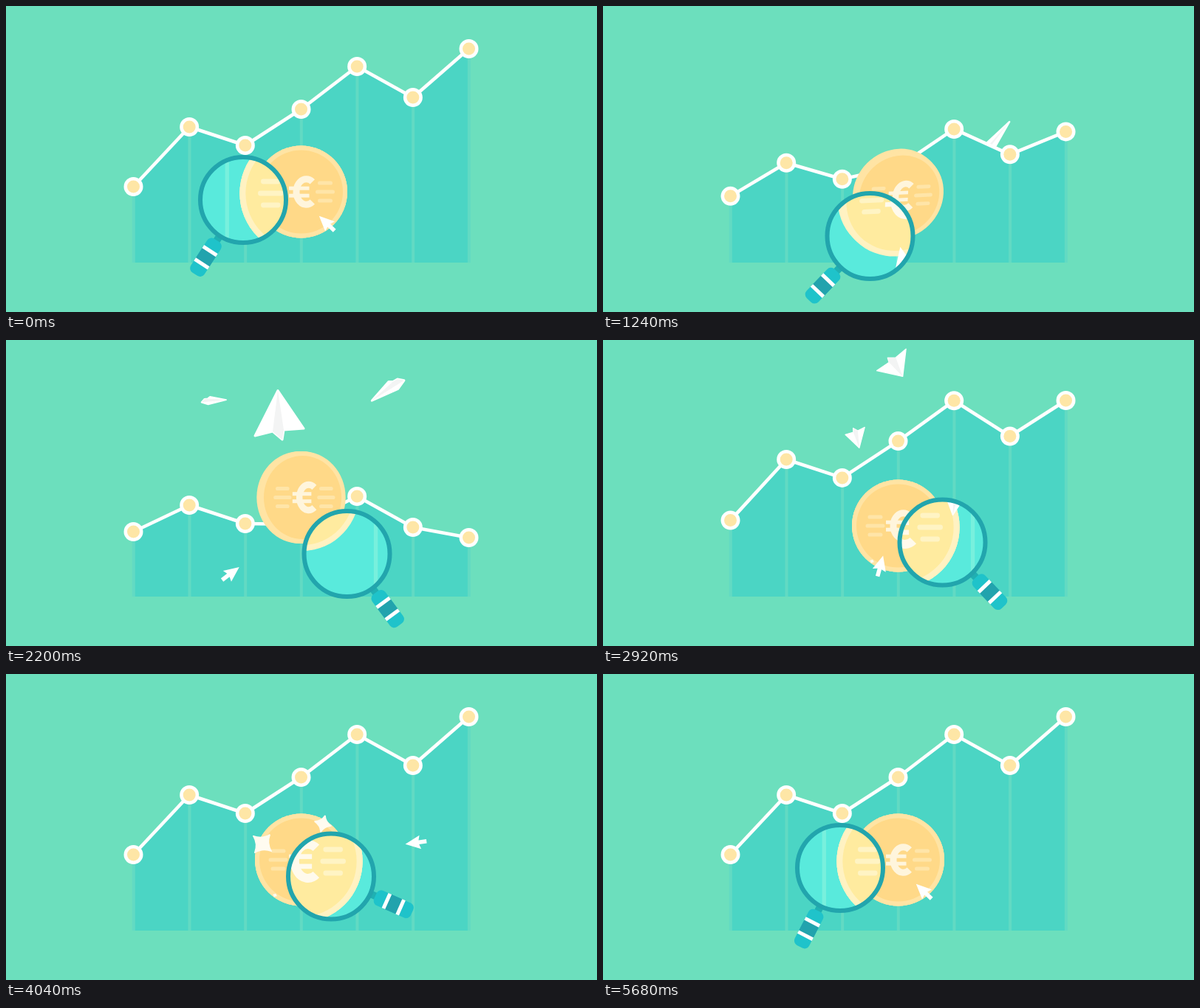
Animation, 800 px wide and 415 px high, one loop 5.72 s. Source, as an HTML page with a canvas:

```html
<!DOCTYPE html>
<html lang="en">
<head>
<meta charset="utf-8">
<title>Growing chart</title>
<style>
html, body { margin: 0; width: 100%; height: 100%; overflow: hidden; background: #6cdfbd; }
canvas { display: block; width: 800px; height: 415px; }
</style>
</head>
<body>
<canvas id="stage" width="800" height="415"></canvas>
<script>
const LOOP = 5720, BASE = 348, ZOOM = 1.33;
const AIM = [390, 252];      // the pointer always looks here
const FOCUS = [399.5, 246];  // the lens magnifies around this spot
const ctx = document.getElementById('stage').getContext('2d');

const PLAIN = { bg: '#6cdfbd', area: '#4bd5c4', grid: '#62dac3', rim: '#ffe4a4', face: '#ffd988',
  bar: '#ffe5a8', euro: '#fff5dc', dot: '#fee6a6', spark: '#fffbf0' };
const BRIGHT = { bg: '#7df5d4', area: '#59eadc', grid: '#78f0dd', rim: '#fff2c2', face: '#ffeb9f',
  bar: '#fff4c4', euro: '#fffaec', dot: '#fff2bd', spark: '#fffdf6' };

const clamp = v => Math.max(0, Math.min(1, v));
const swing = v => (1 - Math.cos(Math.PI * clamp(v))) / 2;
const mix = (a, b, u) => a + (b - a) * u;
const rad = deg => deg * Math.PI / 180;

// Smooth monotone curve through rows [time, a, b, ...]
function track(rows, t) {
  const n = rows.length - 1;
  if (t <= rows[0][0]) return rows[0].slice(1);
  if (t >= rows[n][0]) return rows[n].slice(1);
  const i = rows.findIndex(row => row[0] >= t) - 1;
  const secant = (k, c) => (rows[k + 1][c] - rows[k][c]) / (rows[k + 1][0] - rows[k][0]);
  const slope = (k, c) => {
    if (k === 0 || k === n) return 0;
    const a = secant(k - 1, c), b = secant(k, c);
    return a * b > 0 ? 2 * a * b / (a + b) : 0;
  };
  const h = rows[i + 1][0] - rows[i][0], u = (t - rows[i][0]) / h;
  const ease = u * u * (3 - 2 * u);
  return rows[i].slice(1).map((v, j) => mix(v, rows[i + 1][j + 1], ease)
    + h * u * (1 - u) * (slope(i, j + 1) * (1 - u) - slope(i + 1, j + 1) * u));
}

const HIGH = [245, 164, 189, 140, 82, 124, 58];
const LOW = [260, 224, 249, 250, 212, 254, 268];

// time, x, y, handle angle
const LENS = [[640, 321, 263, 123], [1240, 361.5, 312, 133.6], [2200, 461.5, 290, 53.5],
  [2920, 459.5, 274.5, 46.4], [4040, 440, 274.5, 24], [4720, 359, 282, 24.5],
  [5400, 321, 263, 89], [5720, 321, 263, 118]];

// time, angle and distance of the tip from its aim
const POINTER = [[300, 44, 47], [1240, 78, 56], [2200, 143, 93], [2920, 105, 42],
  [3640, 285, 108], [4000, 352, 152], [4436, 352, 152], [5163, 404, 47]];

// time, y, tilt, direction of the tilt
const COIN = [[640, 252, 0, 50], [1240, 255, 24, 46], [1900, 207, 20, 0],
  [2200, 213.5, 21.5, 0], [2700, 252, 0, 0]];

// time, nose x, nose y, heading, width, length, side view; a negative width mirrors
const PLANES = [
  [[1240, 551, 156, 39.5, 0.2, 0.78, 0], [2200, 494, 83, -120, 1, 1, 1],
    [2920, 455, 240, -170, 0.3, 0.35, 0]],
  [[1750, 383, 150, -8, 0.9, 0.95, 0], [2200, 368, 67, 0, 1, 1, 0],
    [2550, 374, 27, 70, 0.8, 0.6, 0], [2920, 406, 50, 149, 0.74, 0.48, 0]],
  [[1750, 272, 130, -10, -0.3, 0.5, 0.5], [2200, 299, 81, 82, -0.65, 0.65, 1],
    [2920, 347, 147, 168, 0.42, 0.42, 0]]
].map(poses => {
  const [time, x, y, ...look] = poses[0];
  const launch = [Math.max(1120, time - 400), mix(x, 400, 0.3), 250, ...look];
  const last = poses[poses.length - 1];
  const landing = [last[0] + 1.7 * (250 - last[2]) + 140, 400, 255, 180, 0, 0, 0];
  return [launch, ...poses, landing];
});
const TOP_VIEW = [[0, 1.5], [-31, 63], [-7, 57], [6, 68], [8, 55], [35, 53]];
const SIDE_VIEW = [[0, 1.5], [-4, 40], [2, 53], [8, 46], [8, 39], [11, 34]];

// x, y, radius, tilt, appears, leaves
const SPARKS = [[347, 230, 16, 40, 3640, 4700], [429, 203, 11.5, 15, 3720, 5150],
  [461, 253, 13.5, 3, 4300, 5240], [364, 300, 4.5, 20, 2780, 4180]];

function polygon(points, color) {
  ctx.beginPath();
  points.forEach(p => ctx.lineTo(p[0], p[1]));
  ctx.closePath();
  ctx.fillStyle = color;
  ctx.fill();
}

function disc(x, y, r, color) {
  ctx.beginPath();
  ctx.arc(x, y, r, 0, 2 * Math.PI);
  ctx.fillStyle = color;
  ctx.fill();
}

function pill(x, y, w, h, r, color) {
  ctx.beginPath();
  ctx.roundRect(x, y, w, h, r);
  ctx.fillStyle = color;
  ctx.fill();
}

function at(x, y, deg, draw) {
  ctx.save();
  ctx.translate(x, y);
  ctx.rotate(rad(deg));
  draw();
  ctx.restore();
}

function chartPoints(t) {
  return HIGH.map((top, i) => {
    const fall = swing((t - 65 - 60 * i) / 1560);
    const up = t - 2400 - 29 * i;
    const rise = 1.035 * swing(up / 460) - 0.035 * swing((up - 460) / 200);
    return [172.5 + 75.67 * i, mix(top, LOW[i], fall - rise)];
  });
}

function drawChart(t, c) {
  const pts = chartPoints(t);
  polygon([[174, BASE], [174, pts[0][1]], ...pts.slice(1, 6), [625, pts[6][1]], [625, BASE]], c.area);
  ctx.fillStyle = c.grid;
  pts.forEach(([x, y]) => ctx.fillRect(x - 1.7, y, 4, BASE - y));
  ctx.beginPath();
  pts.forEach(p => ctx.lineTo(p[0], p[1]));
  ctx.lineWidth = 4.6;
  ctx.lineJoin = 'round';
  ctx.strokeStyle = '#fff';
  ctx.stroke();
  pts.forEach(([x, y]) => {
    disc(x, y, 13, '#fff');
    disc(x, y, 8.5, c.dot);
  });
}

function drawCoin(t, c) {
  const [y, tilt, axis] = track(COIN, t);
  const depth = 5.5 * Math.sin(rad(tilt)), squash = Math.cos(rad(tilt));
  // Squeeze along the tilt direction, moved by a share of the coin's thickness
  const layer = (shift, draw) => at(399.5, y, axis, () => {
    ctx.translate(shift * depth, 0);
    ctx.scale(squash, 1);
    ctx.rotate(rad(-axis));
    draw();
  });
  for (const shift of [-1, 0, 1]) layer(shift, () => disc(0, 0, 62.5, c.rim));
  layer(1, () => disc(0, 0, 56.5, c.face));
  layer(1.8, () => {
    for (const side of [-31, 32.5]) {
      for (const row of [-12, 0, 12]) {
        const len = row ? 20 : 26;
        pill(side - len / 2, row - 2.6, len, 5.2, 2.6, c.bar);
      }
    }
    ctx.beginPath();
    ctx.ellipse(7, 0, 13.5, 17.3, 0, rad(52), rad(308));
    ctx.lineWidth = 9;
    ctx.strokeStyle = ctx.fillStyle = c.euro;
    ctx.stroke();
    ctx.fillRect(-16.5, -7.3, 27.5, 5);
    ctx.fillRect(-16.5, 2.7, 27.5, 5);
  });
}

function drawPlanes(t, behind) {
  for (const rows of PLANES) {
    const inAir = t >= rows[0][0] && t < rows[rows.length - 1][0];
    if (!inAir || (t < 2150) !== behind) continue;
    const [x, y, heading, w, len, side] = track(rows, t);
    const shape = TOP_VIEW.map(([px, py], i) =>
      [w * mix(px, SIDE_VIEW[i][0], side), len * mix(py, SIDE_VIEW[i][1], side)]);
    at(x, y, heading, () => {
      ctx.lineJoin = 'round';
      ctx.lineWidth = 3 * len;
      ctx.strokeStyle = '#fff';
      polygon(shape, '#fff');
      ctx.stroke();
      polygon([0, 2, 3, 4].map(i => shape[i]), '#f3f4f4');
    });
  }
}

function drawSparks(t, c) {
  for (const [x, y, size, tilt, on, off] of SPARKS) {
    const s = size * Math.min(swing((t - on) / 300), swing((off - t) / 300));
    if (s < 0.1) continue;
    at(x, y, tilt, () => {
      ctx.beginPath();
      ctx.moveTo(0, -s);
      for (let i = 1; i <= 4; i++) {
        const mid = rad(90 * i - 135), end = rad(90 * i - 90);
        ctx.quadraticCurveTo(0.36 * s * Math.cos(mid), 0.36 * s * Math.sin(mid),
          s * Math.cos(end), s * Math.sin(end));
      }
      ctx.fillStyle = ctx.strokeStyle = c.spark;
      ctx.lineWidth = 1.5;
      ctx.lineJoin = 'round';
      ctx.fill();
      ctx.stroke();
    });
  }
}

function drawPointer(t) {
  const [angle, dist] = track(POINTER, t);
  at(...AIM, angle - 90, () => {
    ctx.translate(0, dist);
    polygon([[0, 0], [9.3, 20.5], [2.8, 18.5], [2.8, 29], [-2.8, 29], [-2.8, 18.5], [-9.3, 20.5]], '#fff');
  });
}

function drawScene(t, c) {
  ctx.fillStyle = c.bg;
  ctx.fillRect(0, 0, 800, 415);
  drawPlanes(t, true);
  drawChart(t, c);
  drawCoin(t, c);
  drawPlanes(t, false);
  drawSparks(t, c);
  drawPointer(t);
}

function drawLens(t) {
  const [x, y, turn] = track(LENS, t);
  at(x, y, turn, () => {
    pill(56, -5, 16, 10, 0, '#20b0b2');
    pill(65.5, -11, 54.5, 22, 7, '#1fc3ca');
    pill(82, -11, 20, 22, 0, '#22a3ad');
    for (const stripe of [80, 100.5]) pill(stripe, -11, 5, 22, 0, '#fff');
  });
  ctx.save();
  ctx.beginPath();
  ctx.arc(x, y, 57, 0, 2 * Math.PI);
  ctx.clip();
  ctx.translate(...FOCUS);
  ctx.scale(ZOOM, ZOOM);
  ctx.translate(-FOCUS[0], -FOCUS[1]);
  drawScene(t, BRIGHT);
  ctx.restore();
  ctx.beginPath();
  ctx.arc(x, y, 58, 0, 2 * Math.PI);
  ctx.lineWidth = 6;
  ctx.strokeStyle = '#22a5ad';
  ctx.stroke();
}

let start = null;
function frame(now) {
  if (start === null) start = now;
  const t = (now - start) % LOOP;
  drawScene(t, PLAIN);
  drawLens(t);
  requestAnimationFrame(frame);
}
requestAnimationFrame(frame);
</script>
</body>
</html>
```
